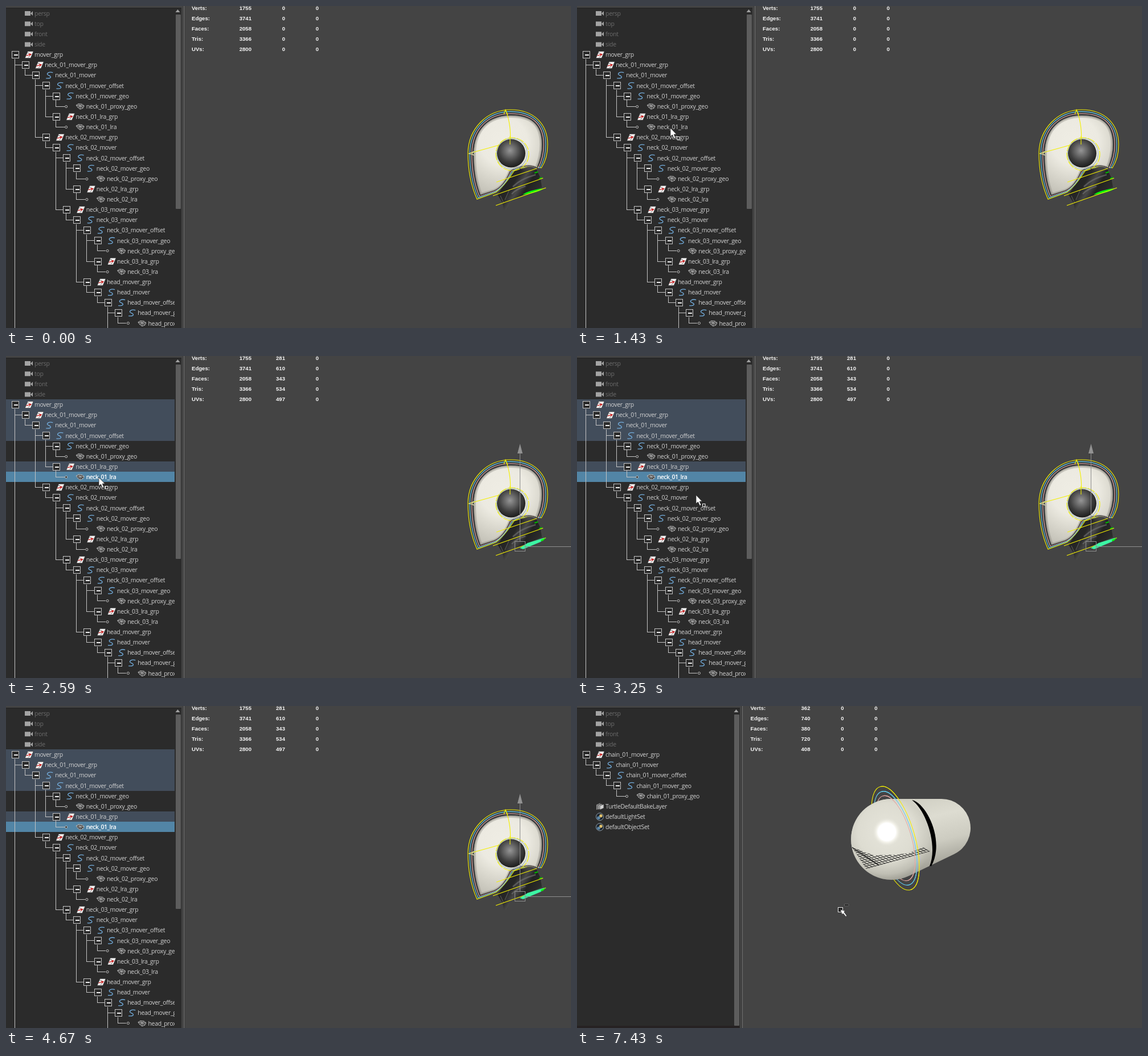
Write an HTML page that moves like this. It is 992 px wide and 565 px high and loops after 8000 ms.

```html
<!DOCTYPE html>
<html lang="en">
<head>
<meta charset="utf-8">
<title>Outliner and viewport</title>
<style>
html, body { margin: 0; width: 100%; height: 100%; overflow: hidden; background: #444; }
svg { display: block; width: 100vw; height: 100vh; }
.tree text { font: 10.5px "Open Sans", "Noto Sans", sans-serif; letter-spacing: -.3px; fill: #d2d2d2; }
.tree text.dim { fill: #6c6c6c; }
.tree text.on { fill: #fff; font-weight: 600; letter-spacing: -.5px; }
.stats text { font: bold 9.6px "Liberation Sans", Arial, sans-serif; fill: #f4f4f4; }
.num { text-anchor: end; }
.wire { fill: none; stroke: #c4c4c4; shape-rendering: crispEdges; }
.line { fill: none; stroke-width: 1.1; }
.y { stroke: #f4f000; } .c { stroke: #62cdee; } .p { stroke: #e4a8a4; } .k { stroke: #2c2e32; }
</style>
</head>
<body>
<svg id="stage" viewBox="0 0 992 565" preserveAspectRatio="none">
<defs>
  <radialGradient id="skull" gradientUnits="userSpaceOnUse" cx="874" cy="238" r="104">
    <stop offset="0" stop-color="#efede4"/><stop offset=".4" stop-color="#eceae1"/>
    <stop offset=".6" stop-color="#dcdad0"/><stop offset="1" stop-color="#bdbbb1"/>
  </radialGradient>
  <radialGradient id="ear" cx=".46" cy=".4" r=".56">
    <stop offset="0" stop-color="#969696"/><stop offset=".3" stop-color="#707070"/>
    <stop offset=".7" stop-color="#3e3e3e"/><stop offset="1" stop-color="#232323"/>
  </radialGradient>
  <linearGradient id="neck" x1="0" y1="0" x2="1" y2=".55">
    <stop offset="0" stop-color="#202020"/><stop offset=".42" stop-color="#262626"/>
    <stop offset=".56" stop-color="#484848"/><stop offset=".7" stop-color="#222"/><stop offset="1" stop-color="#303030"/>
  </linearGradient>
  <linearGradient id="body" gradientUnits="userSpaceOnUse" x1="575" y1="163" x2="607" y2="297">
    <stop offset="0" stop-color="#cfcec2"/><stop offset=".3" stop-color="#dddcd1"/>
    <stop offset=".62" stop-color="#cdccc1"/><stop offset="1" stop-color="#98978d"/>
  </linearGradient>
  <radialGradient id="ball" gradientUnits="userSpaceOnUse" cx="544" cy="221" r="92">
    <stop offset="0" stop-color="#e6e5db"/><stop offset=".55" stop-color="#dddcd1"/>
    <stop offset=".8" stop-color="#c9c8bd" stop-opacity=".7"/><stop offset="1" stop-color="#a9a89e" stop-opacity="0"/>
  </radialGradient>
  <radialGradient id="shine">
    <stop offset="0" stop-color="#fff"/><stop offset=".62" stop-color="#fff"/>
    <stop offset=".74" stop-color="#f7f6ee" stop-opacity=".8"/><stop offset="1" stop-color="#e6e5db" stop-opacity="0"/>
  </radialGradient>
  <clipPath id="gridClip"><path d="M483 248L521 262L560 261L583 258L608 248L620 255L508 286Z"/></clipPath>
  <path id="capsule" d="M552 163H640A51 51 0 0 1 662 260L583 298A71 71 0 1 1 552 163Z"/>

  <g id="cam"><path d="M-8-4H2V4H-8ZM2 0L6-4V4Z" fill="#a4a4a4"/></g>
  <g id="grp">
    <path d="M-2.500-6H7.500L2.500 6H-7.500Z" fill="#f4f4f4" stroke="#222" stroke-width=".6"/>
    <path d="M-5 1.500L0 0" stroke="#c41c1c" stroke-width="1.300"/><path d="M-.5-2.500L4.500-1L.5 2.500Z" fill="#c41c1c"/>
    <path d="M-3-3H0M-2 4L1 3" stroke="#555" stroke-width=".8"/>
  </g>
  <g id="crv"><path d="M6-5C-1-7-7-3-2-.5C5 2 3 6-6 5" fill="none" stroke="#74aede" stroke-width="1.300"/></g>
  <g id="mesh">
    <path d="M-7-2L-3-4.500L3-4L7-1L5 3L0 5L-4 2Z" fill="#3a3a3a"/>
    <path d="M-7-2L-3-4.500L3-4L7-1L5 3L0 5L-4 2ZM-7-2L0-1L7-1M-3-4.500L0-1L5 3M3-4L0-1L-4 2M0-1V5"
      fill="none" stroke="#bdbdbd" stroke-width=".9"/>
  </g>
  <g id="layer">
    <path d="M-6-3L1-6V3L-6 6Z" fill="#888"/><path d="M-3-2L4-5V3L-3 6Z" fill="#b4b4b4" stroke="#2a2a2a" stroke-width=".7"/>
    <path d="M0-1L7-4V3L0 6Z" fill="#d2d2d2" stroke="#2a2a2a" stroke-width=".7"/>
  </g>
  <g id="set">
    <circle r="6.500" fill="#1c2530" stroke="#93a3ae"/><circle cx="-2" cy="2" r="2.800" fill="#5d87a8"/>
    <circle cx="2" cy="-1.500" r="2.700" fill="#e2c26c"/>
  </g>
</defs>

<g id="sceneA">
  <g id="panelA"></g>
  <g id="headView">
    <path d="M893 287L931 286L938 301L941 318L907 332L886 343L880 358H874L872 346L863 331Z" fill="url(#neck)"/>
    <path d="M890 317Q904 303 930 296M888 330Q896 321 912 316" fill="none" stroke="#747474" stroke-width="2.500" opacity=".6"/>
    <path d="M876 340L884 322M868 333L874 346" stroke="#555" stroke-width="1.200"/>
    <path id="disc" d="M907 331Q918 323 944 320Q935 328 907 331Z" fill="#08f808"/>
    <path d="M928 293L934 291M936 303L941 301" stroke="#0b0" stroke-width="2"/>
    <g id="shell"></g>
    <path class="line y" d="M861 309L932 285M855 333L943 302M860 350L948 319"/>
    <path class="line y" d="M812 259L866 244M874 190L877 182L881 191M877 182Q888 210 885 243"/>
    <path d="M813 259L822 255L818 259L822 262Z" fill="none" stroke="#dfe5b0"/>
    <circle class="line" cx="888" cy="259" r="27" stroke="#9fb9bd"/>
    <circle class="line y" cx="889" cy="260" r="29" stroke-dasharray="14 2"/>
    <circle cx="887" cy="258.500" r="25" fill="url(#ear)"/>
    <path class="line y" d="M885 228V243"/>
  </g>
  <g id="gizmo">
    <path d="M902 337L916 328L945 319L939 326L908 339Z" fill="#3cf5a4"/>
    <path d="M938 323L948 319L942 325Z" fill="#08f808"/>
    <path class="wire" style="stroke:#8e8e8e" d="M902.500 170V325M911 334.500H992M893.500 325.500H911.500V342.500H893.500Z"/>
    <path d="M902.500 154L907 171H898Z" fill="#929292"/>
  </g>
</g>

<g id="sceneB">
  <g id="panelB"></g>
  <g id="ringsBack" transform="translate(559 232) rotate(73.600)"></g>
  <use href="#capsule" fill="url(#body)"/>
  <circle cx="552" cy="234" r="71" fill="url(#ball)"/>
  <circle cx="544" cy="221" r="25" fill="url(#shine)"/>
  <path d="M592 166C618 178 645 240 622 281L619 281C634 245 613 183 588 165Z" fill="#000"/>
  <path id="grid" clip-path="url(#gridClip)" fill="none" stroke="#1f1f1f" stroke-width=".9"/>
  <path d="M483 248L530 279" stroke="#151515" stroke-width="1.300"/>
  <g id="ringsFront" transform="translate(559 232) rotate(73.600)"></g>
</g>

<g id="arrow">
  <path d="M0 0V15L3.500 12L6.500 18.500L9 17.500L6.200 11.200L10.500 11Z" fill="#fff" stroke="#222" stroke-width=".7"/>
  <rect x="11.500" y="15.500" width="4.500" height="4.500" fill="#222" stroke="#fff"/>
</g>
<g id="picker">
  <rect x=".5" y=".5" width="8" height="8" fill="#222" stroke="#e8e8e8"/>
  <path d="M4.500 4.500L12.500 6.500L10.800 8.500L15.500 15L14 16.500L9.500 11L7.500 12.500Z" fill="#fff" stroke="#222" stroke-width=".5"/>
  <g id="minus"><rect x="11.500" y="-5" width="7.500" height="2.500" fill="#111" stroke="#999" stroke-width=".5"/></g>
</g>
</svg>

<script>
const LOOP = 8000, PITCH = 18.13;
const $ = id => document.getElementById(id);
const snap = v => Math.round(v) + .5;
const rowY = i => 13 + PITCH * i;
const colX = level => 16 + PITCH * level;
const iconShift = { cam: 25, grp: 24.7, crv: 24, mesh: 23.5, layer: 24, set: 24 };

// Row: [level, icon, name]
const cameras = ['persp', 'top', 'front', 'side'].map(n => [0, 'cam', n]);

function limb(name, level) {
  return [
    [level, 'grp', name + '_mover_grp'],
    [level + 1, 'crv', name + '_mover'],
    [level + 2, 'crv', name + '_mover_offset'],
    [level + 3, 'crv', name + '_mover_geo'],
    [level + 4, 'mesh', name + '_proxy_geo'],
    [level + 3, 'grp', name + '_lra_grp'],
    [level + 4, 'mesh', name + '_lra']
  ];
}

const rowsA = [...cameras, [0, 'grp', 'mover_grp'],
  ...limb('neck_01', 1), ...limb('neck_02', 3), ...limb('neck_03', 5), ...limb('head', 7),
  [1, 'grp', '']];
const rowsB = [...cameras, ...limb('chain_01', 0).slice(0, 5),
  [0, 'layer', 'TurtleDefaultBakeLayer'], [0, 'set', 'defaultLightSet'], [0, 'set', 'defaultObjectSet']];

function drawRow([level, icon, name], i, rows, picked) {
  const y = rowY(i), x = colX(level), cy = snap(y - .5);
  const leaf = icon === 'mesh', box = icon === 'grp' || icon === 'crv';
  let out = '';
  if (level) {
    let p = i - 1;
    while (rows[p][0] !== level - 1) p--;
    out += `<path class="wire" d="M${snap(colX(level - 1) - 1.5)} ${snap(rowY(p) + 6)}V${cy}H${x - (leaf ? 4 : 6)}"/>`;
  }
  if (box) {
    const bx = snap(x - 6.5), by = cy - 6;
    out += `<rect class="wire" style="fill:#2b2b2b" x="${bx}" y="${by}" width="12" height="12"/>
      <path class="wire" style="stroke:#eee;stroke-width:2" d="M${bx + 3} ${cy}h7"/>`;
  }
  if (leaf) out += `<circle cx="${x - 1}" cy="${cy}" r="2" fill="#2b2b2b" stroke="#c4c4c4"/>`;
  const cls = icon === 'cam' ? 'dim' : picked ? 'on' : '';
  return out + `<use href="#${icon}" x="${x + iconShift[icon]}" y="${y}"/>
    <text class="${cls}" x="${x + 34}" y="${Math.round(y + 3.7)}">${name}</text>`;
}

function tree(rows, picked = -1) {
  return rows.map((r, i) => drawRow(r, i, rows, i === picked)).join('');
}

function stats(x, cols) {
  return ['Verts:', 'Edges:', 'Faces:', 'Tris:', 'UVs:'].map((label, i) => {
    const y = Math.round(6.6 + 18.2 * i);
    return `<text x="${x}" y="${y}">${label}</text>` + cols.map((c, k) =>
      `<text class="num" x="${x + [105, 164, 223][k]}" y="${y}">${c[i] || 0}</text>`).join('');
  }).join('');
}

// Viewport and list background, scrollbar, divider
function panel(w, thumbEnd) {
  return `<rect width="992" height="565" fill="#444"/>
    <rect y="3" width="${w + 12}" height="562" fill="#2b2b2b"/>
    <rect y="3" width="${w + 12}" height="1" fill="#222"/>
    <rect x="${w + 2}" y="15" width="9" height="${thumbEnd - 15}" rx="1" fill="#5d5d5d"/>
    <path d="M${w + 1.5} 11L${w + 5.5} 6L${w + 9.5} 11Z" fill="#a0a0a0"/>
    <rect x="${w + 15}" width="1" height="565" fill="#383838"/>
    <rect x="${w + 16}" width="1" height="565" fill="#747474"/>`;
}

const clip = w => `<clipPath id="clip${w}"><rect width="${w}" height="565"/></clipPath>`;
const edge = i => Math.floor(rowY(i) - 9);
const bar = (from, count, color) =>
  `<rect y="${edge(from)}" width="296" height="${edge(from + count) - edge(from)}" fill="${color}"/>`;
const counts = [1755, 3741, 2058, 3366, 2800];

$('panelA').innerHTML = panel(296, 356) + clip(296) +
  `<g class="tree" clip-path="url(#clip296)">
    <g id="plain">${tree(rowsA)}</g>
    <g id="picked">${bar(4, 4, '#424d5b')}${bar(10, 1, '#424d5b')}${bar(11, 1, '#5285a6')}${tree(rowsA, 11)}</g>
  </g>
  <g class="stats"><g id="statsIdle">${stats(326, [counts, [], []])}</g>
  <g id="statsPicked">${stats(326, [counts, [281, 610, 343, 534, 497], []])}</g></g>`;

$('panelB').innerHTML = panel(274, 561) + clip(274) +
  `<rect y="561" width="285" height="4" fill="#262223"/>
  <g class="tree" clip-path="url(#clip274)">${tree(rowsB)}</g>
  <g class="stats">${stats(304.5, [[362, 740, 380, 720, 408], [], []])}</g>`;

// Nested outlines of the helmet, inset by d
function helmet(d, attr) {
  const l = 811 + d, t = 182 + d, r = 951 - d, b = 339 - d * .75;
  return `<path ${attr} d="M${827 + d * .6} ${b}C${l + 4} 312 ${l} 285 ${l} 258
    C${l + 1} 216 ${843 + d * .5} ${t} 886 ${t}C${928 - d * .5} ${t} ${r} 208 ${r} 243
    C${r} 261 ${946 - d} 275 ${940 - d * .8} 284Q922 278 ${908 - d * .3} ${284 - d * .2}
    Q894 284 ${889 - d * .4} ${294 - d * .4}Q874 317 ${860 - d * .3} ${327 - d * .3}Z"/>`;
}
$('shell').innerHTML = helmet(10, 'fill="url(#skull)"') +
  helmet(12, 'fill="none" stroke="#8c8a82" stroke-width="4" opacity=".4"') +
  helmet(10.5, 'fill="none" stroke="#77756e" stroke-width="1.5" opacity=".7"') +
  [[0, 'y'], [5, 'k'], [3.4, 'c'], [6.8, 'p'], [9, 'k']]
    .map(([d, c]) => helmet(d, `class="line ${c}"`)).join('');

const rings = [[1, 'y'], [.905, 'c'], [.82, 'p']];
const A = 94.3, B = 33.9;
$('ringsBack').innerHTML = rings.map(([s, c]) =>
  `<ellipse class="line ${c}" rx="${A * s}" ry="${B * s}"/>`).join('');
$('ringsFront').innerHTML = rings.map(([s, c]) =>
  `<path class="line ${c}" d="M${-A * s} 0A${A * s} ${B * s} 0 0 1 ${A * s} 0"/>`).join('');

let mesh = '';
for (let k = 0; k < 12; k++) mesh += `M470 ${295 - 4 * k}l160-43`;
for (let x = 410; x < 630; x += 8) mesh += `M${x} 240l90 56`;
$('grid').setAttribute('d', mesh);

// Held keyframes: every pose stays until the next one
function play(el, frames) {
  el.animate(frames.map(([t, pose]) => ({ offset: t / LOOP, easing: 'step-end', ...pose })),
    { duration: LOOP, iterations: Infinity });
}
function show(id, from, to) {
  const frames = [[0, { opacity: from ? 0 : 1 }]];
  if (from) frames.push([from, { opacity: 1 }]);
  if (to < LOOP) frames.push([to, { opacity: 0 }]);
  frames.push([LOOP, { opacity: to < LOOP ? 0 : 1 }]);
  play($(id), frames);
}

const at = (t, x, y, opacity = 1) => [t, { transform: `translate(${x}px, ${y}px)`, opacity }];
const linear = u => u, easeOut = u => u * (2 - u);

// n held positions between t0 and t1, ending on (x1, y1)
function move(t0, t1, n, x0, y0, x1, y1, ease = linear) {
  return Array.from({ length: n }, (_, i) => {
    const u = ease((i + 1) / n);
    return at(t0 + (t1 - t0) * i / (n - 1), Math.round(x0 + (x1 - x0) * u), Math.round(y0 + (y1 - y0) * u));
  });
}

play($('arrow'), [
  at(0, 894, 550, 0),
  ...move(310, 1070, 13, 1020, 606, 170, 226, easeOut),
  ...move(1130, 1430, 5, 170, 226, 164, 214),
  at(2590, 163, 213),
  ...move(2780, 2890, 3, 163, 213, 156, 198),
  ...move(3070, 3250, 4, 156, 198, 209, 244, easeOut),
  at(4550, 380, 364), at(4610, 619, 511), at(4670, 619, 511, 0),
  at(LOOP, 619, 511, 0)
]);
play($('picker'), [
  at(0, 450, 414, 0), at(6940, 450, 414), at(7000, 439, 356),
  ...move(7240, 7430, 3, 439, 356, 458, 353), at(LOOP, 458, 353)
]);

show('sceneA', 0, 6350);
show('sceneB', 6350, LOOP);
show('plain', 0, 1610);
show('picked', 1610, LOOP);
show('statsIdle', 0, 1660);
show('statsPicked', 1660, LOOP);
show('gizmo', 1660, LOOP);
show('disc', 0, 1660);
show('minus', 7430, LOOP);
</script>
</body>
</html>
```
